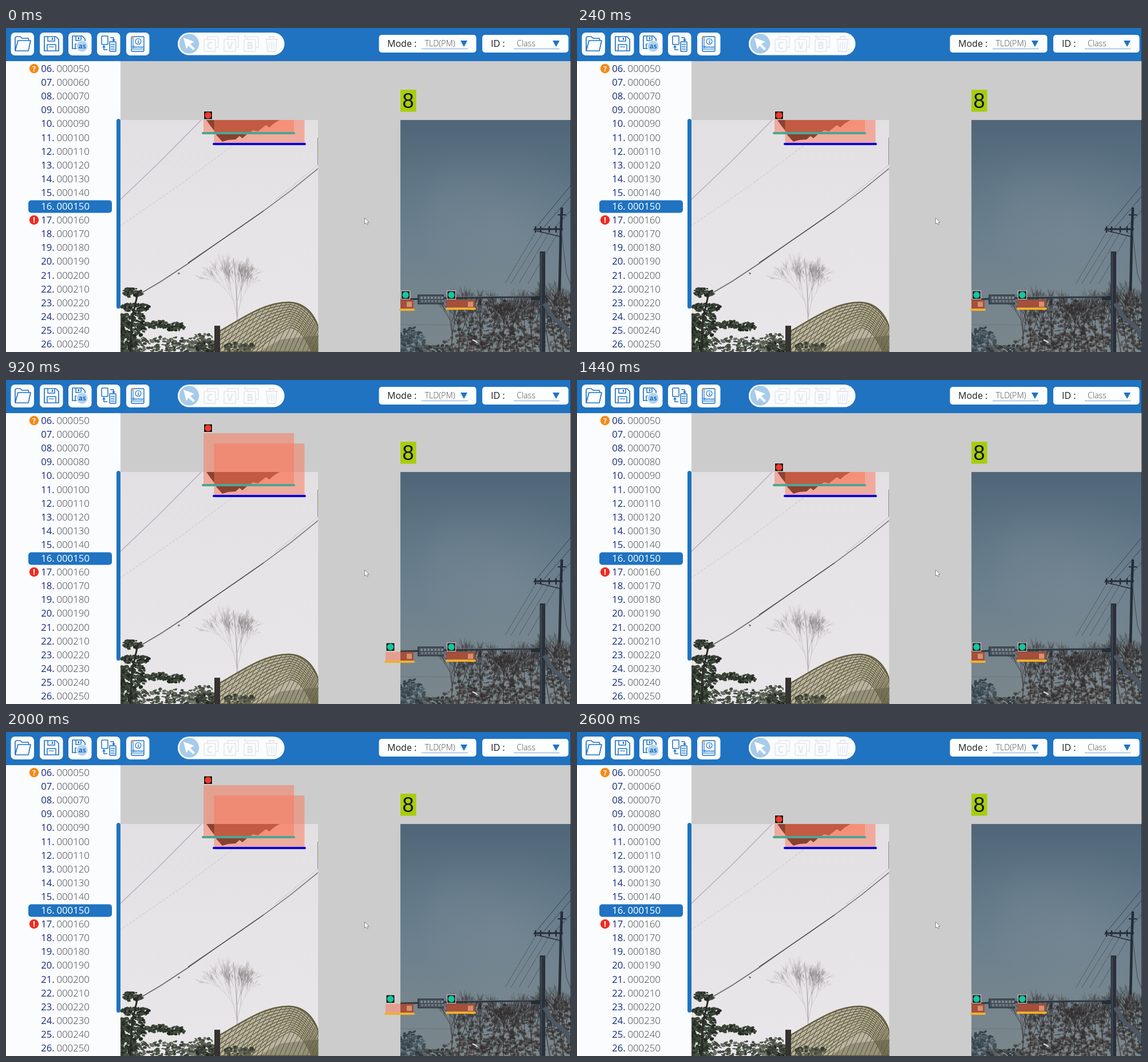
An HTML page with a canvas that plays this animation: 987x567 px, repeating every 2680 ms.

```html
<!DOCTYPE html>
<html lang="en">
<head>
<meta charset="utf-8">
<title>Annotation tool</title>
<style>
html, body { margin: 0; width: 100%; height: 100%; overflow: hidden; background: #ccc; }
canvas { display: block; }
</style>
</head>
<body>
<canvas id="stage" width="987" height="567"></canvas>
<script>
const W = 987, H = 567, LOOP = 2680;
const BLUE = '#1f73c1', NAVY = '#15287c', PALE = '#e5e8eb';
const FONT = '"Open Sans", "Noto Sans", sans-serif';
const stage = document.getElementById('stage').getContext('2d');
const backdrop = document.createElement('canvas');
backdrop.width = W;
backdrop.height = H;
let c = backdrop.getContext('2d');

let seed = 7;
function rnd(lo = 0, hi = 1) {
  seed = (seed * 16807) % 2147483647;
  return lo + (hi - lo) * seed / 2147483647;
}

function rect(x, y, w, h, fill) {
  c.fillStyle = fill;
  c.fillRect(x, y, w, h);
}
function round(x, y, w, h, r, fill, stroke, lw = 1.5) {
  c.beginPath();
  c.roundRect(x, y, w, h, r);
  if (fill) { c.fillStyle = fill; c.fill(); }
  if (stroke) { c.strokeStyle = stroke; c.lineWidth = lw; c.stroke(); }
}
function disc(x, y, r, fill) {
  c.beginPath();
  c.arc(x, y, r, 0, 7);
  c.fillStyle = fill;
  c.fill();
}
function path(points, close) {
  c.beginPath();
  for (let i = 0; i < points.length; i += 2) c.lineTo(points[i], points[i + 1]);
  if (close) c.closePath();
}
function line(points, color, lw = 1, cap = 'butt', close = false) {
  path(points, close);
  c.lineCap = cap;
  c.lineJoin = 'round';
  c.strokeStyle = color;
  c.lineWidth = lw;
  c.stroke();
}
function poly(points, fill) {
  path(points, true);
  c.fillStyle = fill;
  c.fill();
}
function label(str, x, y, size, color, weight = 400, align = 'left', font = FONT) {
  c.font = `${weight} ${size}px ${font}`;
  c.textAlign = align;
  c.fillStyle = color;
  c.fillText(str, x, y);
}
function gradient(x, y, w, h, ...stops) {
  const g = c.createLinearGradient(0, y, 0, y + h);
  stops.forEach((s, i) => g.addColorStop(i / (stops.length - 1), s));
  rect(x, y, w, h, g);
}
function clipped(x, y, w, h, draw) {
  c.save();
  c.beginPath();
  c.rect(x, y, w, h);
  c.clip();
  draw();
  c.restore();
}

function foliage(cx, cy, rx, ry, count, colors) {
  for (let i = 0; i < count; i++) {
    const a = rnd(0, 6.28), d = Math.sqrt(rnd());
    c.beginPath();
    c.ellipse(cx + Math.cos(a) * rx * d, cy + Math.sin(a) * ry * d,
      rnd(1.5, 4.2), rnd(1, 2.8), rnd(-0.6, 0.6), 0, 7);
    c.fillStyle = colors[i % colors.length];
    c.fill();
  }
}
function branch(x, y, angle, len, width, depth, color, spread = 0.6) {
  const x2 = x + Math.cos(angle) * len, y2 = y + Math.sin(angle) * len;
  line([x, y, x2, y2], color, width);
  if (!depth) return;
  for (let i = 0; i < 3; i++) {
    branch(x2, y2, angle + rnd(-spread, spread), len * rnd(0.6, 0.92),
      Math.max(0.5, width * 0.66), depth - 1, color, spread);
  }
}

function lattice() {
  c.save();
  c.beginPath();
  c.moveTo(366, 567);
  c.lineTo(374, 530);
  c.bezierCurveTo(410, 510, 450, 480, 494, 480);
  c.bezierCurveTo(525, 481, 541, 504, 547, 530);
  c.lineTo(547, 567);
  c.closePath();
  c.fillStyle = '#b9b5a3';
  c.fill();
  c.strokeStyle = '#615c3f';
  c.lineWidth = 2.5;
  c.stroke();
  c.clip();
  for (let i = 0; i < 12; i++) {
    const d = i * 8;
    c.beginPath();
    c.moveTo(366, 535 + d);
    c.bezierCurveTo(410, 507 + d, 445, 480 + d * 0.8, 496, 480 + d * 0.5);
    c.quadraticCurveTo(530, 485 + d * 0.5, 548, 530 + d);
    c.lineWidth = 1.3;
    c.strokeStyle = '#635d3d';
    c.stroke();
  }
  for (let x = 340; x < 560; x += 8) {
    c.beginPath();
    c.moveTo(x, 570);
    c.quadraticCurveTo(x + 22, 515, x + 54, 470);
    c.lineWidth = 1.2;
    c.strokeStyle = '#716b48';
    c.stroke();
  }
  poly([440, 567, 480, 545, 545, 538, 547, 567], 'rgba(80,77,52,.35)');
  c.restore();
}

function leftPhoto() {
  gradient(200, 161, 345.5, 406, '#e3e0e3', '#e7e4e8', '#e8e6e9');
  poly([350, 161, 357, 171, 364, 180, 368, 188, 378, 199, 388, 196, 401, 195, 408, 189,
    413, 193, 422, 185, 432, 179, 440, 181, 454, 170, 460, 174, 468, 167, 478, 161], '#1d0a08');
  line([341, 161, 270, 233, 200, 300], '#b5b0b8', 1.5);
  c.setLineDash([5, 2]);
  line([396, 206, 300, 277, 200, 346], '#d0cbd1', 1.2);
  c.setLineDash([]);
  line([545, 239, 500, 277, 470, 301], '#c4c0c5', 1);
  line([545, 246, 497, 285, 450, 320, 385, 365, 320, 411, 270, 444, 236, 464], '#6a676b', 1.5);
  line([450, 320, 400, 355, 318, 411], '#4a474b', 1.4);
  disc(302, 429.5, 1.8, '#777');
  line([544.5, 192, 544.5, 239], '#8a888c', 1);

  for (const a of [-1.8, -1.57, -1.35])
    branch(404, 505, a, 27, 1, 5, 'rgba(140,134,136,.34)', 0.36);
  line([404, 520, 402, 450, 397, 403], '#a09a9c', 1);

  const pine = ['#313a30', '#20281f', '#465045', '#3b4134'];
  foliage(272, 559, 72, 19, 260, ['#50584b', '#394238', '#697064', '#444d40']);
  foliage(341, 552, 28, 17, 90, ['#596052', '#3f473c', '#747a6c']);
  foliage(218, 519, 27, 26, 240, pine);
  foliage(224, 489, 28, 7, 80, pine);
  foliage(221, 463, 18, 8, 65, pine);
  foliage(264, 519, 23, 7, 60, pine);
  foliage(296, 523, 16, 8, 48, pine);
  foliage(211, 550, 18, 22, 140, pine);
  line([217, 567, 220, 510, 231, 460], '#272b25', 3);
  lattice();
  foliage(350, 559, 20, 11, 60, pine);
  foliage(408, 559, 28, 9, 70, ['#4c5144', '#61644f', '#393f35']);
  rect(364, 521, 10, 46, '#34332f');
}

function haze(x, y, r, alpha) {
  const g = c.createRadialGradient(x, y, 10, x, y, r);
  g.addColorStop(0, `rgba(140,151,158,${alpha})`);
  g.addColorStop(1, 'rgba(140,151,158,0)');
  rect(689, 161, 298, 406, g);
}

function rightPhoto() {
  gradient(689, 161, 298, 406, '#506678', '#5c7384', '#6a7f8d', '#75858e', '#7b868b');
  haze(870, 340, 150, 0.26);
  haze(770, 300, 110, 0.14);

  const wire = '#3b444f', steel = '#252c36';
  line([921, 355, 987, 275], wire, 1);
  line([936, 353, 987, 294], wire, 1);
  line([955, 353, 987, 319], wire, 1);
  for (const [x, end] of [[925, 872], [938, 882], [949, 896], [965, 912]])
    line([x, 357, end, 447], '#535d66', 1);
  line([935, 393, 850, 428, 780, 447], '#7a858e', 0.9);
  line([689, 519, 795, 520], '#67747d', 1.2);

  const bark = 'rgba(52,46,45,.6)';
  const scrub = ['rgba(56,50,48,.6)', 'rgba(76,68,62,.5)', 'rgba(43,42,42,.6)'];
  foliage(858, 520, 76, 46, 420, scrub);
  foliage(855, 552, 92, 20, 300, scrub);
  foliage(970, 520, 26, 52, 240, scrub);
  for (let x = 778; x < 936; x += 13)
    branch(x, 567, rnd(-1.8, -1.3), rnd(27, 34), 2, 4, bark, 0.45);
  for (let x = 950; x < 990; x += 12)
    branch(x, 567, rnd(-1.8, -1.35), 34, 2, 4, bark, 0.45);
  foliage(707, 549, 24, 26, 190, ['#425059', '#35434b', '#526069']);
  foliage(748, 563, 35, 9, 90, ['#454c4c', '#33393b', '#596060']);
  line([816, 546, 823, 550], '#d8dcda', 2.5, 'round');

  line([967, 460, 969, 365, 971, 314], steel, 4.5);
  line([922, 352, 973, 352], steel, 3);
  line([927, 355, 968, 365], steel, 1.3);
  for (const x of [925, 934, 949, 961]) line([x, 347, x, 358], steel, 2.5);
  line([964, 327, 978, 327], steel, 2);
  line([970, 355, 979, 430, 987, 450], '#424c57', 1);

  line([689, 475, 765, 473, 937, 470], '#2c343e', 3);
  line([790, 470, 925, 469], '#687580', 1);
  line([917, 473, 938, 473], steel, 6);
  rect(932.5, 391, 9.5, 176, '#2a313b');
  rect(934, 394, 2, 173, '#3d4854');
  line([940, 482, 957, 508, 980, 526, 987, 543], '#4d5866', 7);
  rect(719, 466.5, 46, 17, '#2f3944');
  rect(721, 468, 42, 14, '#46515c');
  for (let x = 724; x < 761; x += 6) {
    rect(x, 470, 4, 4, '#7d8890');
    rect(x + 1, 476, 4, 4, '#6c7781');
  }
  rect(689, 475.5, 23, 16, '#4b2a20');
  rect(769.5, 475.5, 50, 16, '#4b2a20');
}

function floppy(x, y, s) {
  line([x, y, x + s - 5, y, x + s, y + 5, x + s, y + s, x, y + s], BLUE, 1.7, 'round', true);
  line([x + 6, y, x + 6, y + 8, x + s - 7, y + 8, x + s - 7, y], BLUE, 1.5);
  line([x + s - 11, y + 2, x + s - 11, y + 6], BLUE, 2);
  line([x + 5, y + s, x + 5, y + 14, x + s - 5, y + 14, x + s - 5, y + s], BLUE, 1.5);
  line([x + 8, y + 18, x + s - 8, y + 18], BLUE, 1.2);
}
function arrowTriangle(x, y) {
  poly([x - 6, y - 5, x + 6, y - 5, x, y + 6], BLUE);
}

function header() {
  rect(0, 0, W, 58, BLUE);
  for (const x of [8.5, 59, 109, 159, 210]) round(x, 8, 40.5, 40, 7, '#fcfdff');

  line([16, 39, 16, 17, 18, 15, 25, 15, 28, 18, 39, 18, 40, 22], BLUE, 1.7);
  line([16, 40, 21, 22, 43, 22, 39, 40], BLUE, 1.7, 'round', true);
  floppy(67, 15, 25);
  floppy(116, 14, 22);
  disc(133, 32, 10.5, '#fff');
  disc(133, 32, 9.5, '#b4d3ee');
  label('as', 133, 36, 12, BLUE, 700, 'center');

  round(167, 14, 11, 15, 1, null, BLUE);
  round(181, 24, 11, 17, 1, '#e1f0fd', BLUE);
  for (const y of [29, 33, 37]) line([183, y, 190, y], BLUE, 1.2);
  line([182, 17, 188, 17, 188, 22], BLUE, 1.5);
  poly([185, 20, 191, 20, 188, 24], BLUE);
  line([177, 38, 171, 38, 171, 33], BLUE, 1.5);
  poly([168, 34, 174, 34, 171, 30], BLUE);

  round(219, 15, 22, 26, 2, '#eff7ff', BLUE, 1.4);
  line([222, 15, 222, 36], BLUE, 1);
  line([220, 37, 241, 37], BLUE, 1);
  disc(231, 23.5, 5.5, BLUE);
  disc(231, 23.5, 4.4, '#fff');
  label('i', 231, 27, 9, BLUE, 700, 'center');
  label('Manual', 230.5, 35, 5.5, BLUE, 700, 'center');
  disc(221, 15.5, 2, '#f29a35');

  round(300, 8, 186.5, 39.5, 20, '#fafcfe');
  disc(320, 27.5, 17.3, '#a7cbea');
  poly([310, 17, 329, 24, 322, 28, 330, 36, 327, 39, 319, 31, 315, 37], '#fff');
  [['C', 346], ['V', 381], ['B', 416]].forEach(([char, x]) => {
    round(x + 6, 15, 19, 19, 2, null, PALE, 1.7);
    round(x, 20, 20, 21, 2, '#fafcfe', PALE, 1.7);
    label(char, x + 10, 37, 17, PALE, 700, 'center');
  });
  line([415, 15, 421, 15], PALE, 1.5);
  line([418, 12, 418, 18], PALE, 1.5);
  line([453, 20, 475, 20], PALE, 2);
  line([460, 19, 460, 15, 468, 15, 468, 19], PALE, 1.8);
  line([455, 22, 457, 41, 471, 41, 473, 22], PALE, 1.8);
  for (const x of [460, 464, 468]) line([x, 25, x, 37], PALE, 1.5);

  round(651.5, 12, 170, 31, 5, '#fcfdff');
  round(832, 12, 150.5, 31, 5, '#fcfdff');
  label('Mode :', 666, 32.5, 16, '#222');
  label('TLD(PM)', 731.5, 32, 14.2, '#4a4c50', 300);
  label('ID :', 847, 32.5, 16, '#222');
  label('Class', 892, 32, 14.2, '#4a4c50', 300);
  line([726, 36.5, 807, 36.5], '#74a6d6', 1);
  line([887, 36.5, 967, 36.5], '#74a6d6', 1);
  arrowTriangle(800, 27);
  arrowTriangle(961, 27);
}

function sidebar() {
  rect(0, 58, 200, H, '#fbfcfd');
  round(39, 301.5, 146, 22, 5, BLUE);
  for (let i = 0; i < 21; i++) {
    const n = i + 6, y = 77 + i * 24.1, selected = n === 16;
    label(String(n).padStart(2, '0') + '.', 61.3, y, 16.6, selected ? '#fff' : NAVY);
    label(String((n - 1) * 10).padStart(6, '0'), 88.4, y, 16.8,
      selected ? '#fff' : '#404247', selected ? 400 : 300);
  }
  disc(49, 71, 8.2, '#f58a16');
  label('?', 49, 75.7, 13, '#fff', 700, 'center');
  disc(49, 336, 8.2, '#ef2b20');
  label('!', 49, 341, 14, '#fff', 700, 'center');
  round(193, 159, 7, 332, 3.5, BLUE);
}

function paintBackdrop() {
  rect(0, 0, W, H, '#cccccc');
  clipped(200, 161, 345.5, 406, leftPhoto);
  clipped(689, 161, 298, 406, rightPhoto);
  header();
  sidebar();
  rect(986, 0, 1, H, 'rgba(20,30,40,.7)');
  rect(689, 108, 27.5, 38.5, '#a8cd0c');
  label('8', 702.5, 139.5, 36, '#111', 400, 'center', '"Liberation Sans", sans-serif');
  const cursor = [626.5, 332, 626.5, 343, 629, 341, 631, 344.5, 632.5, 343.5, 631, 340, 634, 340];
  poly(cursor, '#fff');
  line(cursor, '#6d6d6d', 0.8, 'butt', true);
}

function marker(x, y, color) {
  rect(x, y, 16, 15.5, '#dcdcdc');
  rect(x + 1, y + 1, 14, 13.5, '#141a18');
  disc(x + 8, y + 7.75, 5.7, color);
}
function region(x, y, right, bottom) {
  rect(x, y, right - x, bottom - y, 'rgba(252,118,88,.5)');
}
function signal(x, right, y) {
  region(x, 475.5, right, y);
  rect(right - 12, 479, 9, 9, 'rgba(235,181,137,.65)');
}

function annotations(expanded) {
  region(345, expanded ? 93 : 161, 503, 183);
  region(363.5, expanded ? 111 : 161, 521.5, 202);
  line([344, 184, 503, 184], '#48a892', 4, 'round');
  line([363, 203, 522, 203], '#0b09df', 4, 'round');
  marker(345, expanded ? 76.5 : 145, '#f23829');

  const left = expanded ? 663 : 689;
  signal(left, 712, 492);
  signal(769.5, 819, 491);
  line([left, 493, 712, 493], '#efb12e', 4, 'round');
  line([770, 491.3, 819, 491.3], '#efb12e', 4, 'round');
  marker(expanded ? 663.5 : 690, 459.5, '#18c59d');
  marker(770, 459.5, '#18c59d');
}

function frame() {
  const t = (performance.now() - start) % LOOP;
  const expanded = (t >= 800 && t < 1440) || (t >= 2000 && t < 2600);
  stage.drawImage(backdrop, 0, 0);
  annotations(expanded);
  requestAnimationFrame(frame);
}

paintBackdrop();
c = stage;
const start = performance.now();
frame();
</script>
</body>
</html>
```
